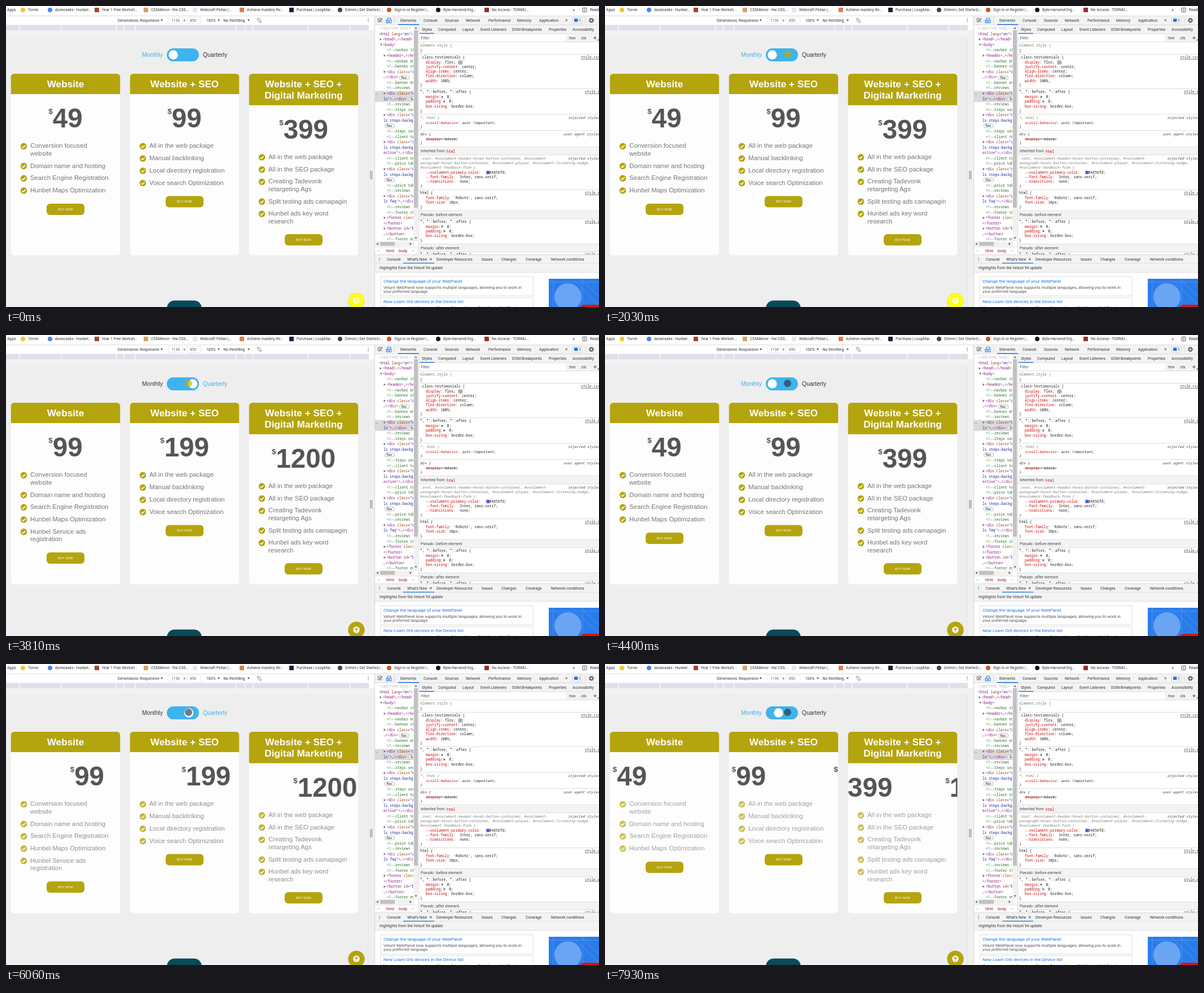
An HTML page that plays this animation: 1051 by 533 pixels, repeating every 8 s.

```html
<!DOCTYPE html>
<html lang="en">
<head>
<meta charset="utf-8">
<title>Pricing toggle</title>
<style>
html, body { margin: 0; width: 100%; height: 100%; overflow: hidden; background: #fff; }
svg { display: block; width: 1051px; height: 533px; }
text { white-space: pre; }
.ui { font-family: Roboto, "Open Sans", sans-serif; }
.mono { font-family: "Noto Sans Mono", "DejaVu Sans Mono", monospace; }
.page { font-family: "Liberation Sans", Arial, sans-serif; }
.bold { font-weight: 700; }
.it { font-style: italic; }
.mid { text-anchor: middle; }
.strike { text-decoration: line-through; }
.under { text-decoration: underline; }
</style>
</head>
<body>
<svg id="stage" viewBox="0 0 1051 533"></svg>
<script>
const GOLD = '#b4a40e', BLUE = '#1a73e8', BAR = '#f3f3f3', RULE = '#cfcfcf', INK = '#333';
const DURATION = 8000, CARD_W = 194;

// Drawing helpers: y is the middle of the text line
const esc = s => s.replace(/&/g, '&amp;').replace(/</g, '&lt;');
const raw = (x, y, s, size, fill, cls, attrs = '') =>
  `<text x="${x}" y="${y + size * .35}" font-size="${size}" fill="${fill}" class="${cls}" ${attrs}>${s}</text>`;
const ui = (x, y, s, size = 6.8, fill = INK) => raw(x, y, esc(s), size, fill, 'ui');
const mono = (x, y, s, fill = '#222', cls = '') => raw(x, y, s, 6.27, fill, 'mono ' + cls);
const page = (x, y, s, size, fill, cls = '', attrs = '') => raw(x, y, esc(s), size, fill, 'page ' + cls, attrs);
const rect = (x, y, w, h, fill, r = 0, attrs = '') =>
  `<rect x="${x}" y="${y}" width="${w}" height="${h}" rx="${r}" fill="${fill}" ${attrs}/>`;
const disc = (x, y, r, fill, attrs = '') => `<circle cx="${x}" cy="${y}" r="${r}" fill="${fill}" ${attrs}/>`;
const path = (d, stroke, w = 1, fill = 'none') => `<path d="${d}" fill="${fill}" stroke="${stroke}" stroke-width="${w}"/>`;
const hline = (x, y, w, c = RULE) => rect(x, y, w, .7, c);
const down = (x, y, s = 2, c = '#444') => path(`M${x - s} ${y - s * .7}h${2 * s}l${-s} ${s * 1.5}z`, 'none', 0, c);
const right = (x, y, c = '#666') => path(`M${x - 1.4} ${y - 2.2}v4.4l3.2 -2.2z`, 'none', 0, c);
const kebab = (x, y) => [-2.6, 0, 2.6].map(d => disc(x, y + d, .7, '#444')).join('');
const span = (fill, s) => `<tspan fill="${fill}">${s}</tspan>`;
const clip = (id, x, y, w, h, r = 0) => `<clipPath id="${id}">${rect(x, y, w, h, '#000', r)}</clipPath>`;

function bookmarks() {
  const items = [
    [39, 'Torvin', '#f2c230', 1], [87, 'dunecasks - Hunbel...', '#4285f4', 1], [170, 'Year 1 Free Worksh...', '#a8402f'],
    [257, 'CSSMelvor - the CSS...', '#d9a066'], [344, 'Webcraft Pellan |...', '#dfe7ec'], [427, 'Achieve mastery thr...', '#df7d50'],
    [515, 'Purchase | LoopMar...', '#17213c'], [601, 'Drimm | Get Started |...', '#444', 1], [688, 'Sign in or Register |...', '#d9501e', 1],
    [775, 'Byte-Harvend-Org...', '#181818', 1], [861, 'No Access - TORMU...', '#a02b30']];
  return rect(0, 0, 1051, 17, '#fff') + ui(2, 7, 'Apps') +
    items.map(([x, s, c, round]) =>
      (round ? disc(x - 9, 7, 4, c) : rect(x - 13, 3, 8, 8, c, 1)) + ui(x, 7, s, 6.75)).join('') +
    ui(1004, 6.5, '»', 9) + rect(1022, 3.5, 7, 7, 'none', 1, 'stroke="#555"') +
    path('M1024 6h3M1024 8h3', '#555', .8) + ui(1035, 7, 'Reading list') + hline(0, 17, 1051);
}

function deviceBar() {
  const ticks = [23, 97, 195, 209, 228, 407, 423, 437, 535, 609];
  const box = (x, s) => rect(x, 20, 25, 11, '#fff', 1, 'stroke="#ddd" stroke-width=".7"') + ui(x + 5, 25.5, s, 6.7, '#666');
  return rect(0, 18, 653, 16, '#fff') +
    ui(198, 25.5, 'Dimensions: Responsive') + down(276, 25.5) +
    box(288, '1136') + ui(314.5, 25.5, '×') + box(321, '850') +
    ui(355, 25.5, '100%') + down(377, 25.5) + ui(385.5, 25.5, 'No throttling') + down(430, 25.5) +
    path('M449 22.5l3 3l-3 3l-3 -3zM445 24a4.4 4.4 0 0 1 3 -3M453 27a4.4 4.4 0 0 1 -3 3', '#555', .8) + kebab(642, 25.5) +
    rect(0, 33.5, 643, 9.5, '#dfe1e9') + ticks.map(x => rect(x, 33.5, 1.2, 9.5, '#fff')).join('');
}

function list(x, y, items) {
  let out = '';
  for (const item of items) {
    const lines = item.split('/');
    out += disc(x + 23, y + .8, 5.8, GOLD) + path(`M${x + 20} ${y + 1}l2.2 2.2l4 -4.2`, '#fff', 1.6);
    out += lines.map((s, i) => page(x + 34.5, y + i * 13.3, s, 11.4, '#757575')).join('');
    y += 21.75 + 13.3 * (lines.length - 1);
  }
  return out;
}

function price(cx, y, amount) {
  const x = cx - (7.5 + amount.length * 26.4) / 2;
  return page(x, y - 12, '$', 13.4, '#555', 'bold') + page(x + 7.5, y, amount, 47.5, '#555', 'bold');
}

function card(i, titles, prices, items, buyY, more = '') {
  const x = 8.5 + i * 211, cx = x + CARD_W / 2, head = 36 + (titles.length - 1) * 19.7, low = titles.length > 1 ? 19.5 : 0;
  return clip('card' + i, x, 120, CARD_W, 321.5, 6) + `<g clip-path="url(#card${i})">` +
    rect(x, 120, CARD_W, 322, '#fdfdfd') + rect(x, 120, CARD_W, head, GOLD) +
    titles.map((s, k) => page(cx, 138 + k * 19.5, s, 17.2, '#fff', 'bold mid')).join('') +
    `<g class="slide">${prices.map((p, k) => price(cx + k * CARD_W, 198.5 + low, p)).join('')}</g>` +
    `<g class="list">${list(x, 247.5 + low, items)}${more}</g>` +
    `<g id="buy${i}">${rect(cx - 33.5, buyY, 67, 20, GOLD, 6)}${page(cx, buyY + 10, 'BUY NOW', 5.65, '#fff', 'mid')}</g></g>`;
}

function site() {
  return rect(0, 43, 653, 490, '#eee') + rect(0, 43, 643, 10, '#f2f2f2') + rect(641, 53, 2, 480, '#e9e9e9') +
    rect(643, 43, 10, 490, '#f0f0f0') + rect(645.5, 292, 1, 15, '#777') + rect(648, 292, 1, 15, '#777') +
    page(241, 86, 'Monthly', 10.55, INK, '', 'id="monthly"') + page(349, 86, 'Quarterly', 10.5, INK, '', 'id="quarterly"') +
    rect(285, 75, 57, 23, '#3eb4ee', 11.5) + disc(296.5, 86.5, 8.2, '#fff', 'id="knob"') +
    card(0, ['Website'], ['49', '99'],
      ['Conversion focused/website', 'Domain name and hosting', 'Search Engine Registration', 'Hunbel Maps Optimization'], 350,
      `<g id="extra">${list(8.5, 347.8, ['Hunbel Service ads/registration'])}</g>`) +
    card(1, ['Website + SEO'], ['99', '199'],
      ['All in the web package', 'Manual backlinking', 'Local directory registration', 'Voice search Optimization'], 336.5) +
    card(2, ['Website + SEO +', 'Digital Marketing'], ['399', '1200'],
      ['All in the web package', 'All in the SEO package', 'Creating Tadevonk/retargeting Ags',
        'Split testing ads camapagin', 'Hunbel ads key word/research'], 404) +
    rect(285, 521.5, 62, 40, '#0a4a5b', 14) +
    disc(621, 523, 15.2, '#000', 'opacity=".1"') + disc(621, 522, 14.5, GOLD, 'id="top"') + disc(621, 522, 5.8, '#fff', 'id="topIcon"') +
    `<path id="topArrow" d="M621 525.5v-6.4M618.2 521.8l2.8 -2.8l2.8 2.8" fill="none" stroke="${GOLD}" stroke-width="1.3"/>`;
}

function tree() {
  // c: comment, d: opening tag with arrow, w: wrapped line, f: badge only
  const rows = ['t<!DOCTYPE html>', 't<html lang="en">', 'a<head>…</head>', 'v<body>', 'cnavbar start', 'd<header>…</header>',
    'cnavbar end', 'cbanner start', 'd<div class="class', 'w…</div>', 'cbanner end', 'creviews ', 'd<div class="class', 'wls">…</div>',
    'creviews ', 'cSteps section', 'd<div class="class', 'wls steps-background', 'f', 'cSteps section', 'cclient test',
    'd<div class="class', 'wls steps-background', 'wection">…</div>', 'cclient test', 'cprice table', 'd<div class="class',
    'wls steps-background', 'f', 'cprice table', 'creviews', 'd<div class="class', 'wls faq">…</div>', 'creviews', 'cfooter start',
    'd<footer class="', 'w</footer>', 'd<button id="btn', 'w…</button>', 'cfooter end'];
  const tint = s => esc(s).replace(/( lang| class| id)=("[^"&]*"?)/, (m, a, v) => span('#994500', a) + '=' + span('#1a1aa6', v))
    .replace(/^(ls[^"]*)/, (m, a) => span('#1a1aa6', a));
  const badge = (x, y) => rect(x, y - 3.7, 18, 7.4, '#f1f3f4', 3.7, 'stroke="#aaa" stroke-width=".6"') + ui(x + 3.5, y, 'flex', 6);
  let out = rect(654, 150.5, 69, 19.4, '#dadada') + ui(655, 154.5, '…', 7);
  rows.forEach((row, i) => {
    const y = 40 + i * 9.57, k = row[0], s = row.slice(1);
    if (k == 'c') out += mono(675, y, esc('<!--' + s), '#236e25');
    else if (k == 'f') out += badge(671, y);
    else if (k == 'w') out += mono(669, y, tint(s), '#881280');
    else if (k == 't') out += mono(661, y, tint(s), i ? '#881280' : '#b5b5b5');
    else if (k == 'd') out += right(671, y) + mono(674.5, y, tint(s), '#881280');
    else out += (k == 'a' ? right(664, y) : down(665, y, 2, '#666')) + mono(668, y, tint(s), '#881280');
  });
  out += badge(697, 127) + badge(713.5, 165);
  return clip('tree', 653, 34, 69, 383) + `<g clip-path="url(#tree)">${out}</g>` +
    rect(722.5, 34, 8, 383, '#f1f1f1') + rect(723, 43, 7, 314, '#c1c1c1') +
    path('M724.5 40.5l2 -3l2 3z', 'none', 0, '#555') + down(726.5, 411, 2, '#555') +
    rect(654, 417, 69, 8.5, '#f1f1f1') + rect(663, 417.7, 26, 7, '#c1c1c1') +
    path('M659.5 419l-3 2.2l3 2.2z', 'none', 0, '#555') + right(717, 421.2, '#555') +
    hline(653, 426.5, 78) + ui(658, 432, '…', 7) + ui(674, 434, 'html', 7, '#8c1a30') + ui(696, 434, 'body', 7, '#8c1a30') + ui(719, 432, '…', 7);
}

function styles() {
  let out = '';
  const prop = (y, name, value, cls = '') => { out += mono(744, y, span('#c80000', name) + ': ' + value + ';', '#222', cls); };
  const rule = (y, sel, origin = '', x = 1019, cls = '', fill = '#222') => {
    out += mono(734, y, sel + ' {', fill, cls);
    if (origin) out += mono(x, y, origin, '#444', x > 1000 ? 'under' : 'it');
  };
  const end = (y, cls = '') => { out += mono(734, y, '}', '#222', cls) + hline(732, y + 6, 319); };
  const band = (y, s) => { out += rect(732, y - 6.5, 319, 13, BAR) + hline(732, y + 6.5, 319) + ui(735, y, s, 6.8, '#444'); };
  const universal = y => {
    rule(y, '*, *::before, *::after', 'style.css:1', 1026);
    ['margin', 'padding'].forEach((s, i) => {
      prop(y + 9 + i * 8.2, s, '  0');
      out += right(744 + (s.length + 1) * 3.76 + 3, y + 9 + i * 8.2, '#555');
    });
    prop(y + 25.5, 'box-sizing', 'border-box');
    end(y + 33.5);
  };
  rule(70, 'element.style', '', 0, '', '#777'); end(79);
  rule(91, '.class-testimonials', 'style.css:290');
  [['display', 'flex'], ['justify-content', 'center'], ['align-items', 'center'], ['flex-direction', 'column'], ['width', '100%']]
    .forEach(([a, b], i) => prop(100 + i * 8.1, a, b));
  out += rect(802, 97, 6.5, 6, '#ddd', .5, 'stroke="#666" stroke-width=".7"') + path('M805.2 97v6M802 100h6.5', '#666', .7);
  end(140);
  universal(152);
  rule(197.5, span('#777', '*,') + ' html', 'injected stylesheet', 996, 'it', '#777');
  prop(206.5, 'scroll-behavior', 'auto !important', 'it'); end(214, 'it');
  rule(226.5, 'div', 'user agent stylesheet', 988, 'it');
  prop(235.5, 'display', 'block', 'it strike'); end(243, 'it');
  band(257, 'Inherited from ');
  out += mono(781, 257.5, 'html', '#c80000');
  out += mono(734, 269.5, ':root, #voxlument-header-hover-button-container, #voxlument-', '#777', 'it') +
    mono(996, 269.5, 'injected stylesheet', '#444', 'it') +
    mono(734, 278, 'paragraph-hover-button-container, #voxlument-player, #voxlument-listening-nudge,', '#777', 'it');
  rule(286, '#voxlument-feedback-form', '', 0, 'it', '#777');
  prop(295, '--voxlument-primary-color', '   #4856fd');
  out += rect(851.5, 292, 5.6, 5.6, '#4856fd', 0, 'stroke="#888" stroke-width=".5"');
  prop(303, '--font-family', ' Inter, sans-serif');
  prop(311, '--transitions', ' none'); end(319, 'it');
  rule(331, 'html', 'style.css:7', 1026);
  prop(340, 'font-family', "'Roboto', sans-serif"); prop(348, 'font-size', '10px'); end(356);
  band(370, 'Pseudo ::before element');
  universal(381.5);
  band(428.5, 'Pseudo ::after element');
  rule(440, '*, *::before, *::after', 'style.css:1', 1026);
  return clip('styles', 731, 64, 320, 376) + `<g clip-path="url(#styles)">${out}</g>`;
}

function drawer() {
  const tabs = [[675, 'Console'], [711, "What's New"], [763, 'Developer Resources'], [843, 'Issues'], [878, 'Changes'], [921, 'Coverage'], [966, 'Network conditions']];
  const note = (y, h) => rect(664, y, 270, h, '#fff', 0, 'stroke="#d5d5d5" stroke-width=".8"');
  return rect(653, 440, 398, 16, BAR) + hline(653, 440, 398) + kebab(662, 448.5) +
    tabs.map(([x, s]) => ui(x, 448.5, s)).join('') + path('M751 446.5l3.6 3.6M754.6 446.5l-3.6 3.6', '#333', 1) +
    hline(653, 455.5, 398) + rect(704, 454.7, 55, 1.4, BLUE) +
    rect(653, 456.3, 398, 15, BAR) + ui(662, 464, 'Highlights from the Velunt 94 update', 6.9) + hline(653, 471.3, 398) +
    note(479.5, 34) + ui(669, 487, 'Change the language of your WebPanel', 8, BLUE) +
    ui(669, 498, 'Velunt WebPanel now supports multiple languages, allowing you to work in', 7.4, '#555') +
    ui(669, 505.5, 'your preferred language.', 7.4, '#555') +
    note(516.5, 34) + ui(669, 523.5, 'New Loam Orb devices in the Device list', 8, BLUE) +
    ui(669, 534, 'You can now pick the sizes of Loam Orb and Loam Orb Max in WebPanel.', 7.4, '#555') +
    rect(962, 483, 89, 50, '#2a7cea') + path('M962 489h89M970 483v50M1022 483v50M1003 483l48 46M1018 483l33 31', '#5b9bf2', .8) +
    disc(996, 515, 24, '#6aa5f4') + rect(1019, 529, 40, 20, '#e01010', 5);
}

function inspector() {
  const tabs = [[699, 'Elements'], [740, 'Console'], [778, 'Sources'], [815, 'Network'], [855, 'Performance'], [906, 'Memory'], [945, 'Application']];
  const subs = [[737, 'Styles'], [766, 'Computed'], [809, 'Layout'], [841, 'Event Listeners'], [897, 'DOM Breakpoints'], [962, 'Properties'], [1004, 'Accessibility']];
  return rect(653, 18, 398, 515, '#fff') + rect(653, 18, 398, 15.5, BAR) +
    path('M664 28h-4.5v-6h7v2.5M662.5 24.5l4.5 4.5M662.5 24.5v3.2M662.5 24.5h3.2', '#555', .9) +
    path('M676 29v-7.5h6v2M674 25h4.5v5h-4.5zM680 24.5h3v5.5h-3z', BLUE, .9) + rect(688, 20, .7, 11, RULE) +
    tabs.map(([x, s]) => ui(x, 25.5, s)).join('') + ui(991, 25, '»', 9) +
    rect(1004.5, 20.5, 17, 10.5, BAR, 1.5, 'stroke="#ccc" stroke-width=".7"') + rect(1007, 22.5, 6.5, 5.5, BLUE, 1) + ui(1015, 25.5, '1', 6.8) +
    rect(1026, 20, .7, 11, RULE) +
    disc(1037.5, 25.5, 2.6, 'none', 'stroke="#555" stroke-width="1.6"') +
    disc(1037.5, 25.5, 4, 'none', 'stroke="#555" stroke-width="1.2" stroke-dasharray="1.6 1.54"') +
    hline(653, 33, 398) + rect(695, 32, 37, 1.5, BLUE) +
    tree() +
    rect(731, 34, 320, 15, BAR) + subs.map(([x, s]) => ui(x, 41.5, s)).join('') +
    hline(731, 48.7, 320) + rect(733, 47.8, 26, 1.4, BLUE) +
    rect(992, 49.4, 59, 14, BAR) + ui(735.5, 56.5, 'Filter', 6.8, '#555') +
    ui(997, 56.5, ':hov') + ui(1018, 56.5, '.cls') + path('M1041 56.5h6M1044 53.5v6', '#444', .9) + path('M1048 61l2.5 0l0 -2.5z', 'none', 0, '#444') +
    hline(731, 63.2, 320) + styles() + rect(731, 34, .7, 406, RULE) + drawer() + rect(653, 18, .8, 515, RULE);
}

const $ = id => document.getElementById(id);
$('stage').innerHTML = bookmarks() + deviceBar() + site() + inspector() + disc(0, 0, 6.5, '#000', 'id="pointer"');
const slides = document.querySelectorAll('.slide'), lists = document.querySelectorAll('.list');

const bursts = [[390, 610, 4], [930, 1630, 11], [2030, 2580, 9], [3810, 4400, 10], [5720, 6060, 5], [6060, 6340, 5], [7660, 7930, 5]];
const clicks = [2030, 3810, 5720, 7660], flips = [2070, 3860, 5810, 7730];

function hold(t) {
  let h = 0;
  for (const [a, b, n] of bursts)
    for (let k = 0; k < n; k++) {
      const at = a + Math.floor(k * (b - a) / (n - 1) / 10 + 1e-6) * 10;
      if (at <= t) h = at;
    }
  return h;
}

const clamp = u => Math.min(1, Math.max(0, u));
const mix = (a, b, u) => a + (b - a) * u;
const smooth = u => u * u * (3 - 2 * u);
const bezier = (s, a, b) => 3 * s * (1 - s) ** 2 * a + 3 * s * s * (1 - s) * b + s ** 3;
function ease(x) {
  let lo = 0, hi = 1;
  for (let i = 0; i < 22; i++) {
    const s = (lo + hi) / 2;
    if (bezier(s, .25, .25) < x) lo = s; else hi = s;
  }
  return bezier(hi, .1, 1);
}

function draw(time) {
  const t = hold(time), n = flips.filter(f => f <= t).length, quarterly = n % 2 == 1;
  const p = n ? ease(clamp((t - flips[n - 1]) / 500)) : 1, pos = quarterly ? p : 1 - p;
  slides.forEach(g => g.setAttribute('transform', `translate(${n ? -CARD_W * pos : 0} 0)`));
  lists.forEach(g => g.setAttribute('opacity', p));
  $('knob').setAttribute('cx', 296.5 + 34.5 * pos);
  $('monthly').setAttribute('fill', quarterly ? INK : '#3fb0ea');
  $('quarterly').setAttribute('fill', quarterly ? '#3fb0ea' : INK);
  $('extra').setAttribute('visibility', quarterly ? 'visible' : 'hidden');
  $('buy0').setAttribute('transform', `translate(0 ${quarterly ? 35 : 0})`);

  const focused = n == 0, tone = focused ? '#fcfc1c' : GOLD;
  $('top').setAttribute('fill', tone);
  $('topArrow').setAttribute('stroke', tone);
  $('topIcon').setAttribute('opacity', focused ? .85 : 1);

  const u = smooth(clamp((t - 390) / 220)), v = smooth(clamp((t - 860) / 770));
  const x = mix(mix(858.5, 601.5, u), 323.5, v), y = mix(mix(494.5, 258.5, u), 85.5, v);
  const pressed = clicks.some(c => t >= c && t < c + 60);
  const dot = $('pointer');
  dot.setAttribute('transform', `translate(${x} ${y})`);
  dot.setAttribute('fill', pressed ? 'rgba(190,170,0,.65)' : 'rgba(40,50,60,.65)');
  dot.setAttribute('visibility', t < 390 ? 'hidden' : 'visible');
}

const start = performance.now();
function tick() {
  draw((performance.now() - start) % DURATION);
  requestAnimationFrame(tick);
}
tick();
</script>
</body>
</html>
```
